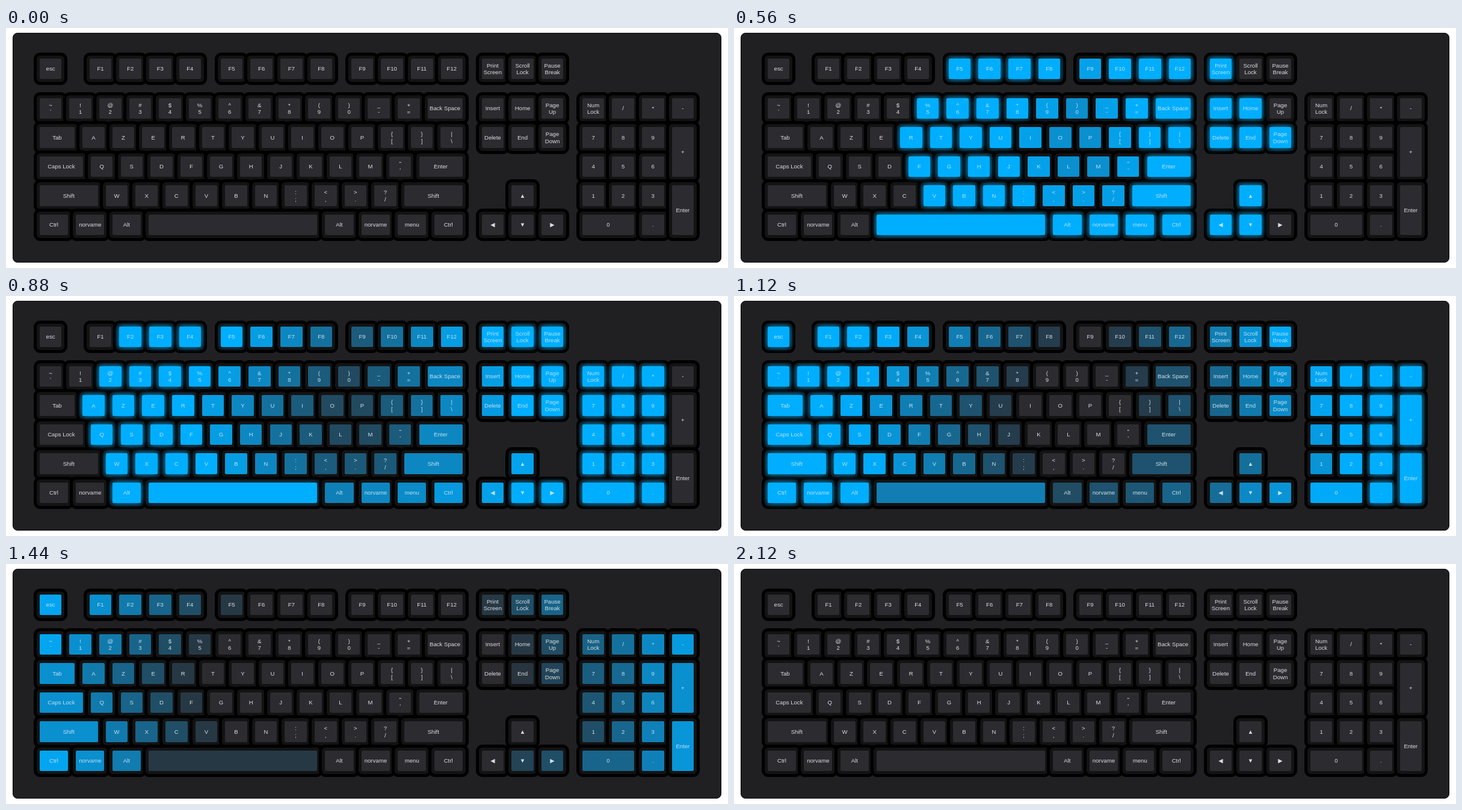
An HTML page that plays this animation: 1200 px wide and 400 px high, repeating every 2.16 s.

```html
<!DOCTYPE html>
<html lang="en">
<head>
<meta charset="utf-8">
<title>Keyboard ripple</title>
<style>
html, body { margin: 0; width: 100%; height: 100%; overflow: hidden; background: #fff; }
#board { position: absolute; left: 11px; top: 8px; width: 1176px; height: 381px; border: 1px solid #0a0a12; border-radius: 8px; background: #202022; }
.base, .cap { position: absolute; box-sizing: border-box; }
.base { background: #131314; border-radius: 6px; box-shadow: 0 0 0 5px #000; }
.cap {
  display: flex; align-items: center; justify-content: center;
  border-radius: 2px; background: #2b2b30; color: #dedede;
  font: 9.6px/11.5px Arial, "Liberation Sans", "DejaVu Sans", sans-serif;
  text-align: center; white-space: pre;
}
</style>
</head>
<body>
<div id="board"></div>
<script>
const LOOP = 2160, FRAME = 40;
const WIDTH = 36.5, HEIGHT = 34.5, GAP = 13.1, ROW = 48.5;
const HOLD = 400, FADE_END = 1000, GLOW_HOLD = 300, GLOW_END = 450;
const LEFT = 55.8, NAV = 790.6, PAD = 957.8;

const keys = [];
const rowTop = row => row ? 116.75 + ROW * (row - 1) : 50.75;
const pairs = text => text.split(" ").map(([upper, lower]) => upper + "\n" + lower);
const ripple = center => i => Math.max(20, Math.abs(i - center) * 100);
const leftWave = i => 900 - 100 * i;

// Lays out one run of keys; widths overrides the standard cap by position.
function addRun(x, row, labels, startOf, widths = {}, height = HEIGHT) {
  labels.forEach((label, i) => {
    const w = widths[i] || WIDTH;
    const start = Array.isArray(startOf) ? startOf[i] : startOf(i);
    keys.push({ x, y: rowTop(row), w, h: height, label, start });
    x += w + GAP;
  });
}

// Function row
const functionWave = i => 100 + Math.abs(i - 9) * 100;
addRun(LEFT, 0, ["esc"], functionWave);
[138.8, 356.8, 573.8].forEach((x, group) => {
  const first = group * 4 + 1;
  addRun(x, 0, [0, 1, 2, 3].map(i => "F" + (first + i)), i => functionWave(first + i));
});
addRun(NAV, 0, ["Print\nScreen", "Scroll\nLock", "Pause\nBreak"], i => functionWave(13 + i));

// Main block
addRun(LEFT, 1, [...pairs("~` !1 @2 #3 $4 %5 ^6 &7 *8 (9 )0 _- +="), "Back Space"],
  ripple(10), { 13: 58 });
addRun(LEFT, 2, ["Tab", ..."AZERTYUIOP", ...pairs("{[ }] |\\")],
  i => i < 10 ? Math.max(20, leftWave(i)) : Math.max(20, (i - 10) * 100), { 0: 58.3 });
addRun(LEFT, 3, ["Caps Lock", ..."QSDFGHJKLM", ...pairs("\"'"), "Enter"],
  i => i === 12 ? 300 : i < 10 ? Math.max(20, leftWave(i)) : Math.max(20, (i - 10) * 100), { 0: 72, 12: 72 });
addRun(LEFT, 4, ["Shift", ..."WXCVBN", ...pairs(":; <, >. ?/"), "Shift"],
  i => i === 11 ? 300 : Math.max(90, leftWave(i)), { 0: 96.9, 11: 96.9 });
const wide = 47.3;
addRun(LEFT, 5, ["Ctrl", "norvame", "Alt", "", "Alt", "norvame", "menu", "Ctrl"],
  [1000, 900, 810, 500, 270, 300, 320, 380],
  { 0: wide, 1: wide, 2: wide, 3: 280.2, 4: wide, 5: wide, 6: wide, 7: wide });

// Navigation block
addRun(NAV, 1, ["Insert", "Home", "Page\nUp"], [400, 500, 590]);
addRun(NAV, 2, ["Delete", "End", "Page\nDown"], [390, 480, 555]);
addRun(NAV + WIDTH + GAP, 4, ["▲"], [430]);
addRun(NAV, 5, ["◀", "▼", "▶"], [420, 550, 600]);

// Number pad
addRun(PAD, 1, ["Num\nLock", "/", "*", "-"], [690, 760, 870, 950]);
addRun(PAD, 2, [..."789"], [670, 725, 860]);
addRun(PAD, 3, [..."456"], [635, 720, 850]);
addRun(PAD, 4, [..."123"], [600, 710, 835]);
addRun(PAD, 5, ["0", "."], [700, 830], { 0: 86.1 });
const padEdge = PAD + 3 * (WIDTH + GAP);
addRun(padEdge, 2, ["+"], [900], {}, HEIGHT + ROW);
addRun(padEdge, 4, ["Enter"], [930], {}, HEIGHT + ROW);

function addBox(className, { x, y, w, h }, grow) {
  const box = document.createElement("div");
  box.className = className;
  box.style.cssText = `left:${x - grow}px;top:${y - grow}px;width:${w + 2 * grow}px;height:${h + 2 * grow}px`;
  return document.body.appendChild(box);
}

keys.forEach(key => addBox("base", key, 5));
keys.forEach(key => {
  key.cap = addBox("cap", key, 0);
  key.cap.textContent = key.label;
});

const fall = (age, from, to) => age < 0 ? 0 : Math.min(1, Math.max(0, (to - age) / (to - from)));
const mix = (a, b, k) => `rgb(${a.map((v, i) => Math.round(v + (b[i] - v) * k))})`;

function draw() {
  const time = Math.floor(performance.now() % LOOP / FRAME) * FRAME;
  for (const { cap, start } of keys) {
    const age = time - start;
    const light = fall(age, HOLD, FADE_END);
    const glow = fall(age, GLOW_HOLD, GLOW_END);
    cap.style.background = mix([43, 43, 48], [0, 174, 255], light);
    cap.style.color = mix([222, 222, 222], [180, 226, 250], light);
    cap.style.boxShadow = glow ? `0 0 10px rgba(0,174,255,${glow})` : "none";
  }
  requestAnimationFrame(draw);
}
draw();
</script>
</body>
</html>
```
